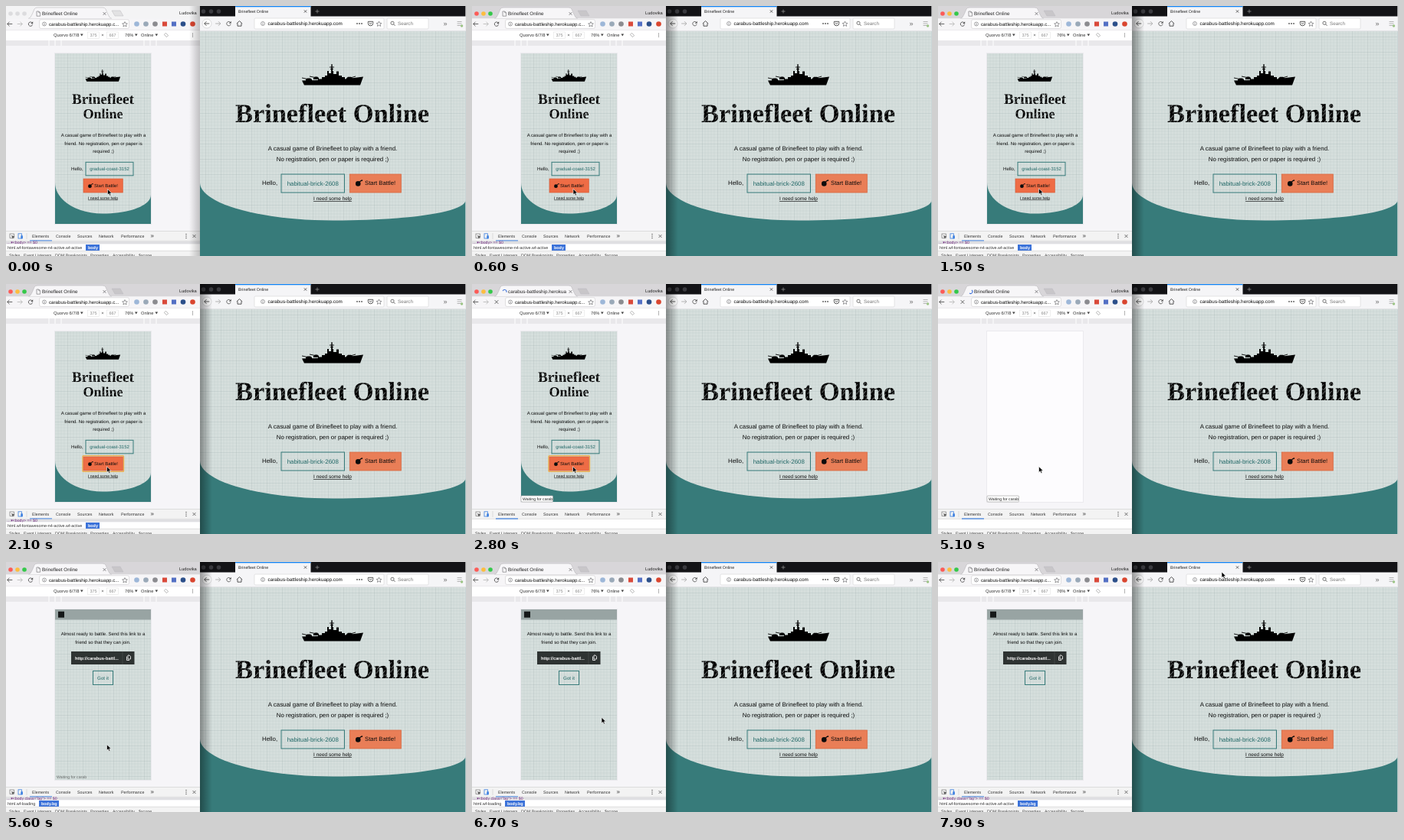
These frames come from a looping animation (600 px wide and 327 px high, 8000 ms). An HTML page:

```html
<!DOCTYPE html>
<html lang="en">
<head>
<meta charset="utf-8">
<title>Two browser windows</title>
<style>
html, body { margin: 0; width: 100%; height: 100%; overflow: hidden; background: #f6f5f8 }
svg { display: block; width: 100vw; height: 100vh }
text { font-family: "Liberation Sans", Arial, sans-serif; white-space: pre; text-rendering: geometricPrecision }
.title { font-family: "Liberation Serif", "Times New Roman", serif; font-weight: bold }
</style>
</head>
<body>
<svg id="stage" viewBox="0 0 600 327"></svg>
<script>
const LOOP = 8000, TEAL = '#377b7a', DEEP = '#1f6665', INK = '#0c0c0c', GREY = '#6b6b6e', PAGE = '#d6dfdd';
const NAME = 'Brinefleet', SITE = NAME + ' Online', HOST = 'carabus-battleship.herokuapp.com';

const rect = (x, y, w, h, fill, more = '') =>
  `<rect x="${x}" y="${y}" width="${w}" height="${h}" fill="${fill}" ${more}/>`;
const text = (x, y, size, str, fill = INK, more = '') =>
  `<text x="${x}" y="${y}" font-size="${size}" fill="${fill}" ${more}>${str}</text>`;
const mid = (x, y, size, str, fill = INK, more = '') =>
  text(x, y, size, str, fill, 'text-anchor="middle" ' + more);
const line = (d, stroke = GREY, w = 1, more = '') =>
  `<path d="${d}" fill="none" stroke="${stroke}" stroke-width="${w}" ${more}/>`;
const dot = (x, y, r, fill, more = '') => `<circle cx="${x}" cy="${y}" r="${r}" fill="${fill}" ${more}/>`;
const dots = (xs, y, r, fills) => xs.map((x, i) => dot(x, y, r, fills[i % fills.length])).join('');
const labels = (y, size, fill, items) => items.map(([x, s]) => text(x, y, size, s, fill)).join('');
const group = (id, body) => `<g id="${id}">${body}</g>`;
const cross = (x, y, r, c = GREY, w = .8) =>
  line(`M${x - r} ${y - r}l${2 * r} ${2 * r}m0 ${-2 * r}l${-2 * r} ${2 * r}`, c, w);
const down = (x, y) => `<path d="M${x} ${y}h3.6l-1.8 2.8z" fill="#444"/>`;
const arrow = (x, y, dir, c) =>
  line(`M${x - 3.3 * dir} ${y}h${6.6 * dir}m${-2.8 * dir} -2.8l${2.8 * dir} 2.8l${-2.8 * dir} 2.8`, c, .9);
const reload = (x, y) =>
  line(`M${x + 2.3} ${y - 1.3}A2.7 2.7 0 1 0 ${x + 2.6} ${y + .9}`, '#555', .9) +
  `<path d="M${x + 3.2} ${y - 3.3}v3h-3z" fill="#555"/>`;
const info = (x, y) => dot(x, y, 2.5, 'none', `stroke="${GREY}" stroke-width=".6"`) +
  line(`M${x} ${y - .4}v2M${x} ${y - 1.5}v.7`, GREY, .7);
const star = (x, y) => line(`M${x} ${y - 3.2}l1 2.2 2.4.2 -1.8 1.6 .5 2.3 -2.1 -1.2 -2.1 1.2 .5 -2.3 -1.8 -1.6 2.4 -.2z`, GREY, .7);

const ship = (x, y, s) => `<g transform="translate(${x} ${y}) scale(${s})" fill="#000">
  <path d="M1 21.5L22 21V19.5H57L81 16.5L77 27.5H4Z"/>
  <path d="M27 20V17H31V15H34V9H36V12H39L39.4 0H40.6L41 9H42V13H46V9.5H49V15H53V17H57V20Z"/>
  <path d="M6 22V20L8 18.5H12L14 20V22ZM16 20V18L18 16.5H21L23 18V20ZM59 20V18.5L61 16.8H65L67 18.5V20Z"/>
  ${line('M8 19.5L1 18M18 17.5L11 16M65 17.8L71 16M37 4H43M38 6.5H42', '#000', .9)}</g>`;

const bomb = (x, y, s) => `<g transform="translate(${x} ${y}) scale(${s})">
  ${dot(-.7, .8, 3, INK)}${line('M1 -1L2.3 -2.4Q3.3 -3.4 4 -2.3', INK, 1.2)}${dot(3.9, -3.1, .8, INK)}</g>`;

const heading = (x, y, size, str) => mid(x, y, size, str, 'url(#hatch)', 'class="title"');

const field = (x, y, w, h, size, str) =>
  rect(x, y, w, h, 'none', `stroke="${TEAL}" stroke-width="1"`) +
  mid(x + w / 2, y + h / 2 + size * .36, size, str, DEEP);

const help = (x, y, size) => mid(x, y, size, 'I need some help', INK, 'text-decoration="underline"');
const paper = d => `<path d="${d}" fill="${PAGE}"/><path d="${d}" fill="url(#grid)"/>`;

// ---------- left window ----------
const tab = `
  ${rect(0, 0, 253, 16.5, '#f4f4f5', 'id="strip"')}
  <path d="M29 16.5Q32 16 34 11L37 4Q38 2 41 2H126Q129 2 130 4L133 11Q135 16 138 16.5Z" fill="#f7f6f8" stroke="#bbb9bc" stroke-width=".6"/>
  <path d="M138 6h11l4 7h-11z" fill="#000" fill-opacity=".07" stroke="#bbb9bc" stroke-width=".5"/>
  ${group('lightsOff', dots([6, 15, 24], 10, 2.8, ['#dcdcde']))}
  ${group('lightsOn', dots([6, 15, 24], 10, 2.8, ['#fc5b57', '#fdbd3e', '#34c84a']))}
  ${group('docIcon', line('M40 7h2.8l1.8 1.8v4.4h-4.6zM42.8 7v1.8h1.8', GREY, .6))}
  ${group('spinner', line('M0 -2.5A2.5 2.5 0 0 1 0 2.5', '#3b6fd8', 1))}
  <g clip-path="url(#tabClip)"><text id="tabTitle" x="47" y="12" font-size="6.3" fill="#222"></text></g>
  ${cross(128.5, 10, 1.9)}
  ${text(226, 11, 5.7, 'Ludovika', '#222')}`;

const toolbar = `
  ${rect(0, 16.5, 253, 15.5, '#f6f5f7')}${line('M0 32H253', '#d3d2d4', .6)}
  ${arrow(5, 23.5, -1, '#555')}${arrow(18, 23.5, 1, '#bbb')}
  ${group('reloadIcon', reload(32, 23.5))}${group('stopIcon', cross(32, 23.5, 2.3, '#555', .9))}
  ${rect(43.5, 17.8, 117, 11.6, '#fff', 'rx="2" stroke="#cbcacd" stroke-width=".6"')}
  ${info(50, 23.5)}${text(56, 25.8, 6.2, HOST.slice(0, -2) + '...')}${star(155, 23.8)}
  ${dots([170.5, 182.5, 194.5], 23.5, 3.3, ['#9db7d8', '#9aa9b8', '#8b8b8f'])}
  ${rect(204, 20.5, 6, 6, '#d9493a')}${rect(216, 20.5, 6, 6, '#5470c4')}
  ${dots([231, 243.5], 23.5, 3.3, ['#2c4f8a', '#d9452f'])}`;

const deviceBar = `
  ${rect(0, 32, 253, 13, '#fff')}
  ${text(62, 40, 5.8, 'Quorvo 6/7/8', '#333')}${down(97, 36.6)}
  ${rect(106.5, 34, 15, 8.5, '#fff', 'stroke="#e4e4e4" stroke-width=".6"')}${mid(114, 40, 5.5, '375', '#888')}
  ${mid(126, 40, 6, '×', '#555')}
  ${rect(131.5, 34, 15, 8.5, '#fff', 'stroke="#e4e4e4" stroke-width=".6"')}${mid(139, 40, 5.5, '667', '#888')}
  ${text(155, 40, 5.7, '76%', '#333')}${down(168, 36.6)}
  ${text(176, 40, 5.7, 'Online', '#333')}${down(194.5, 36.6)}
  <g transform="rotate(-45 209 38)">${rect(207.5, 35.7, 3, 4.6, 'none', 'stroke="#888" stroke-width=".6" rx=".6"')}</g>
  ${[36, 38, 40].map(y => dot(243.5, y, .6, '#555')).join('')}
  ${rect(0, 45, 253, 7, '#e9e8eb')}
  ${line([56, 64, 72, 180, 188, 196].map(x => `M${x} 45v7`).join(''), '#fff', 1)}`;

const homePhone = `
  ${rect(64, 62, 125, 223, TEAL)}
  ${paper('M64 62V231C64 254 92 271.5 126 271.5C161 271.5 189 261 189 247V62Z')}
  ${ship(103, 83, .57)}
  ${heading(126.5, 128, 19.2, NAME)}${heading(126.5, 147, 18, 'Online')}
  ${mid(127, 170.5, 6.05, `A casual game of ${NAME} to play with a`)}
  ${mid(127, 181.5, 6.05, 'friend. No registration, pen or paper is')}
  ${mid(127, 192, 6.05, 'required ;)')}
  ${text(85, 215, 6.1, 'Hello,')}${field(104, 204.3, 62, 17.5, 6, 'gradual-coast-3152')}
  ${group('focusRing', rect(100, 224.6, 53.5, 20.8, 'none', 'stroke="#efb04a" stroke-width="1.4" rx="1"'))}
  ${rect(101, 226, 51.3, 18, '#ee6c45', 'stroke="#d95f3a" stroke-width=".7"')}
  ${bomb(110, 235, .8)}${text(115, 237, 5.95, 'Start Battle!')}
  ${help(126.5, 252.6, 5.1)}`;

const joinPhone = `
  ${paper('M64 62H189V285H64Z')}
  ${rect(64, 62, 125, 13.5, '#98a4a3')}${rect(68, 64.7, 8, 8, '#151818')}
  ${mid(126.5, 96, 6.05, 'Almost ready to battle. Send this link to a')}
  ${mid(126.5, 107, 6.05, 'friend so that they can join.')}
  ${rect(85, 117, 82.5, 17, '#2e3332')}${line('M152 117v17', '#4a504f', .7)}
  ${text(90, 127.6, 5.75, 'http://carabus-battl...', '#fff', 'font-weight="bold"')}
  ${line('M157.5 123.5v5h3.5M159 122h2l1.5 1.5v3.5h-3.5z', '#fff', .8)}
  ${field(113.5, 142.5, 26, 18, 6.2, 'Got it')}`;

const devtools = `
  ${rect(0, 294.5, 253, 33, '#fff')}${rect(0, 294.5, 253, 12.8, '#f3f3f3')}
  ${line('M0 294.5H253M0 307.3H253', '#ccc', .6)}
  ${rect(5, 298, 5.5, 5.5, 'none', 'stroke="#777" stroke-width=".7"')}
  <path d="M7 300l4.5 1.8-1.8.8-.8 2z" fill="#555"/>
  ${rect(16, 297.8, 4.5, 6.2, 'none', 'stroke="#3b7fe0" stroke-width=".8"')}${rect(19.3, 300.3, 2.6, 4, '#3b7fe0')}
  ${line('M27 297v8', '#ccc', .6)}
  ${labels(303.2, 5.3, '#333', [[34, 'Elements'], [65, 'Console'], [93, 'Sources'], [121, 'Network'], [150, 'Performance']])}
  ${text(188.5, 303.4, 8, '»', '#333')}
  ${rect(31, 306.4, 29, 1.2, '#3b7fe0')}
  ${[298.5, 301, 303.5].map(y => dot(235, y, .7, '#555')).join('')}${cross(245.5, 301, 2, '#555')}
  ${group('domRow', rect(0, 307.6, 253, 4, '#dfdfe2') +
    '<text id="domText" x="1" y="311.4" font-size="5.2" fill="#71287d"></text>')}
  ${rect(0, 311.5, 253, 8.8, '#fff')}
  ${group('crumbs', `<text id="path" x="2" y="317.7" font-size="5.4" fill="#333"></text>
    ${rect(0, 312, 18, 8, '#3b72d9', 'id="chip"')}
    <text id="chipText" y="317.7" font-size="5.4" fill="#fff" font-weight="bold"></text>`)}
  ${rect(0, 320.3, 253, 7, '#f3f3f3')}${line('M0 320.3H253', '#ccc', .6)}
  ${labels(327.8, 5.3, '#444', [[4, 'Styles'], [23, 'Event Listeners'], [64, 'DOM Breakpoints'],
    [110, 'Properties'], [139, 'Accessibility'], [173, '$scope']])}`;

const left = `
  ${rect(0, 0, 253, 327, '#f6f5f8')}${tab}${toolbar}${deviceBar}
  ${rect(63.5, 61.5, 126, 224, '#fdfcfe', 'stroke="#ebeaee" stroke-width="1"')}
  ${group('home', homePhone)}${group('join', joinPhone)}
  ${group('status', `<g id="statusBox">${rect(64, 277, 41.5, 8, '#fff', 'stroke="#aaa" stroke-width=".7" rx="1"')}</g>
    <g clip-path="url(#statusClip)">${text(66, 283, 5.2, 'Waiting for carabus', '#222')}</g>`)}
  ${devtools}`;

// ---------- right window ----------
const right = `
  ${rect(253, 0, 347, 14, '#131316')}
  ${dots([257.5, 267.5, 277.5], 7, 2.8, ['#3a3a3f'])}
  ${rect(299, 0, 98.5, 14, '#f5f5f7')}${rect(299, 0, 98.5, 1.3, '#1585f5')}
  ${text(303, 9, 5.3, SITE, '#222')}${cross(390.5, 7, 1.7, '#444')}
  ${line('M403.5 7h5M406 4.5v5', '#999', .7)}
  ${rect(253, 13.5, 347, 19.5, '#f5f5f7')}${line('M253 32.8H600', '#c8c8cb', .6)}
  ${dot(262, 23, 6, '#fff', 'stroke="#c4c4c6" stroke-width=".6"')}${arrow(262, 23, -1, '#444')}
  ${arrow(276.5, 23, 1, '#aaa')}${reload(290.5, 23)}
  ${line('M300.8 23l3.7 -3.5 3.7 3.5M302 22.5v3.7h5v-3.7', '#444', .9)}
  ${rect(324, 16, 169, 14, '#fff', 'rx="1.5" stroke="#d3d3d6" stroke-width=".6"')}
  ${info(335, 23)}${text(341.5, 25.2, 6.35, HOST)}
  ${dots([458, 461, 464], 23, .9, ['#555'])}
  ${line('M472.3 20.3h6.4v2.3a3.2 3.2 0 0 1-6.4 0zM474 22l1.5 1.5 1.5-1.5', '#555', 1)}${star(486.5, 23.3)}
  ${rect(497, 16, 54, 14, '#fff', 'rx="1.5" stroke="#d3d3d6" stroke-width=".6"')}
  ${dot(504, 22.3, 2.1, 'none', 'stroke="#555" stroke-width=".8"')}${line('M505.5 23.8l2 2', '#555', .9)}
  ${text(511, 25.2, 6.3, 'Search', '#777')}
  ${text(570.5, 26, 9, '»', '#666')}
  ${line('M588.5 20.5h6M588.5 23h6M588.5 25.5h6', '#999', .7)}${dot(594.5, 26, 1.7, '#9cc486')}
  ${rect(253, 33, 347, 294, TEAL)}
  ${paper('M253 33V231C253 258 330 280.5 427 280.5C522 280.5 599 270 599.5 254V33Z')}
  ${ship(385, 76, 1)}
  ${heading(425.5, 151.8, 34.4, SITE)}
  ${mid(426, 188.5, 7.9, `A casual game of ${NAME} to play with a friend.`)}
  ${mid(426, 202.7, 7.9, 'No registration, pen or paper is required ;)')}
  ${text(334, 234, 7.9, 'Hello,')}${field(359, 220, 82.5, 24, 7.9, 'habitual-brick-2608')}
  ${rect(448.3, 220, 67, 24, '#e97e57', 'stroke="#d8663f" stroke-width=".8"')}
  ${bomb(460, 231.5, 1.1)}${text(468, 234.2, 7.7, 'Start Battle!')}
  ${help(426, 254.2, 6.5)}
  ${line('M599.6 0V327', '#e4e4e6', .8)}`;

// The window in front throws its shadow on the other one.
const shadow = `${group('shadeLeft', rect(239, 0, 14, 327, 'url(#fadeLeft)'))}
  ${group('shadeRight', rect(253, 0, 16, 327, 'url(#fadeRight)'))}`;
const fade = (id, a, b) => `<linearGradient id="${id}">
  <stop stop-opacity="${a}"/><stop offset="1" stop-opacity="${b}"/></linearGradient>`;

const mesh = (n, gap) => Array.from({ length: n }, (_, i) => `M0 ${i * gap}H20M${i * gap} 0V20`).join('');
document.getElementById('stage').innerHTML = `<defs>
  <pattern id="grid" width="20" height="20" patternUnits="userSpaceOnUse">
    ${line(mesh(5, 4), '#8fa3a1', .5, 'opacity=".24"')}${line('M0 .5H20M.5 0V20', '#80908f', .6, 'opacity=".22"')}</pattern>
  <pattern id="hatch" width="13" height="4.6" patternUnits="userSpaceOnUse" patternTransform="rotate(-52)">
    ${rect(0, 0, 13, 4.6, '#000')}${line('M0 1H6M5 3.3H11', PAGE, .55)}</pattern>
  ${fade('fadeLeft', 0, .22)}${fade('fadeRight', .38, 0)}
  <clipPath id="tabClip">${rect(46, 2, 77, 14, INK)}</clipPath>
  <clipPath id="statusClip">${rect(64, 277, 41, 8, INK)}</clipPath>
</defs>${left}${right}${shadow}
<path id="cursor" d="M0 0V7.6L1.8 6 3 8.8 4.4 8.2 3.2 5.5H5.6Z" fill="#000" stroke="#fff" stroke-width=".6"/>`;

const $ = id => document.getElementById(id);
const show = (id, on) => $(id).style.display = on ? '' : 'none';
const swap = (on, yes, no) => { show(yes, on); show(no, !on); };
const put = (id, str) => { if ($(id).textContent !== str) $(id).textContent = str; };
const ramp = (t, a, b) => Math.min(1, Math.max(0, (t - a) / (b - a)));

const FRONT = 500, PRESS = 2050, LOAD = 2200, BLANK = 3400, WAIT = 4200, READY = 5400, FONTS = 7400;
const PATH = [[0, 132.5, 239.5], [300, 132.5, 239.5], [900, 131.5, 238.8], [6400, 131.5, 238.8], [7600, 370, 13]];

function cursorAt(t) {
  let i = 1;
  while (i < PATH.length - 1 && t > PATH[i][0]) i++;
  const [a, b] = [PATH[i - 1], PATH[i]], k = ramp(t, a[0], b[0]), e = k * k * (3 - 2 * k);
  return [a[1] + (b[1] - a[1]) * e, a[2] + (b[2] - a[2]) * e];
}

function draw(t) {
  const front = t >= FRONT, first = t < BLANK, joined = t >= READY;
  const loading = t >= LOAD && t < BLANK || t >= WAIT && t < READY;
  swap(front, 'lightsOn', 'lightsOff');
  swap(front, 'shadeRight', 'shadeLeft');
  $('strip').setAttribute('fill', front ? '#d8d6d9' : '#f4f4f5');

  show('home', first);
  show('join', joined);
  show('focusRing', t >= PRESS);
  swap(loading, 'spinner', 'docIcon');
  swap(loading, 'stopIcon', 'reloadIcon');
  $('spinner').setAttribute('transform', `translate(42.5 10) rotate(${t * .36})`);
  put('tabTitle', loading && first ? HOST.slice(0, 27) : t >= BLANK && t < WAIT ? SITE + ' - Join' : SITE);

  const gone = first || loading ? 0 : joined ? ramp(t, READY, 5900) : ramp(t, 3500, 4000);
  show('status', t >= LOAD + 100 && gone < 1);
  $('status').setAttribute('opacity', 1 - gone);
  $('statusBox').setAttribute('opacity', gone ? 0 : 1);

  show('crumbs', !loading);
  show('domRow', !loading);
  const active = first || t >= FONTS, x = active ? 104 : 43;
  put('domText', joined ? '…▾<body class="bg"> == $0' : '…▾<body> == $0');
  put('path', active ? 'html.wf-fontawesome-n4-active.wf-active' : 'html.wf-loading');
  put('chipText', joined ? 'body.bg' : 'body');
  $('chip').setAttribute('x', x);
  $('chip').setAttribute('width', joined ? 26 : 18);
  $('chipText').setAttribute('x', x + 3);

  $('cursor').setAttribute('transform', `translate(${cursorAt(t)})`);
}

const start = performance.now();
(function tick() {
  draw((performance.now() - start) % LOOP);
  requestAnimationFrame(tick);
})();
</script>
</body>
</html>
```
